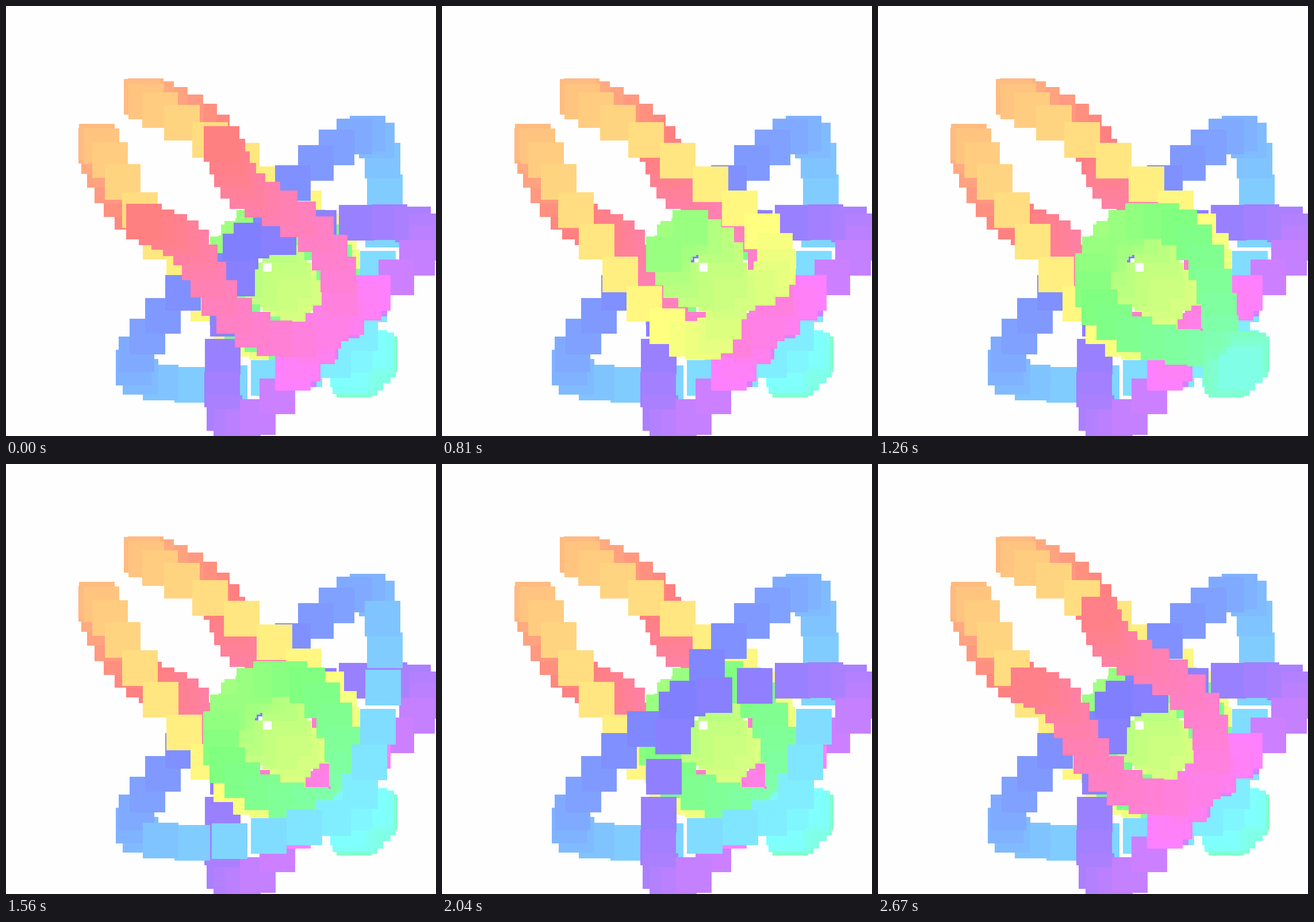
Animation of 748 by 748 pixels, one loop 2700 ms. Source, as an HTML page with a canvas:

```html
<!DOCTYPE html>
<html>
<head>
<meta charset="utf-8">
<style>
html, body { margin: 0; width: 100%; height: 100%; overflow: hidden; background: #fefefe; }
canvas { display: block; }
</style>
</head>
<body>
<canvas id="stage" width="748" height="748"></canvas>
<script>
const ctx = document.getElementById('stage').getContext('2d');
const STEPS = 90, STEP_MS = 30, SIZE = 62, REACH = 4;

// Key points of the closed wandering path, evenly spaced in time.
const keys = [
  [344, 209], [261, 144], [207, 130], [337, 210], [526, 361], [525, 456],
  [396, 455], [384, 369], [493, 354], [561, 489], [567, 606], [597, 604],
  [601, 564], [443, 613], [217, 620], [222, 536], [377, 396], [623, 345],
  [697, 393], [542, 525], [468, 607], [547, 488], [493, 352], [384, 287]
];

// Smooth Lagrange curve through the key points nearest to time t (in keys).
function pointAt(t) {
  const base = Math.floor(t), f = t - base;
  let x = 0, y = 0;
  for (let j = 1 - REACH; j <= REACH; j++) {
    let weight = 1;
    for (let m = 1 - REACH; m <= REACH; m++) {
      if (m !== j) weight *= (f - m) / (j - m);
    }
    const key = keys[(base + j + keys.length) % keys.length];
    x += weight * key[0];
    y += weight * key[1];
  }
  return [Math.round(x), Math.round(y)];
}

const trail = Array.from({ length: STEPS }, (_, step) => pointAt(step * keys.length / STEPS));

// The last full turn of squares, oldest first, each mirrored in the diagonal.
function draw(now) {
  const current = Math.floor(now / STEP_MS) % STEPS;
  ctx.fillStyle = '#fefefe';
  ctx.fillRect(0, 0, 748, 748);
  for (let n = 1; n <= STEPS; n++) {
    const step = (current + n) % STEPS;
    const [x, y] = trail[step];
    ctx.fillStyle = `hsl(${step * 360 / STEPS}, 100%, 75%)`;
    ctx.fillRect(x, y, SIZE, SIZE);
    ctx.fillRect(y, x, SIZE, SIZE);
  }
}

const start = performance.now();
function tick() {
  draw(performance.now() - start);
  requestAnimationFrame(tick);
}
tick();
</script>
</body>
</html>
```
